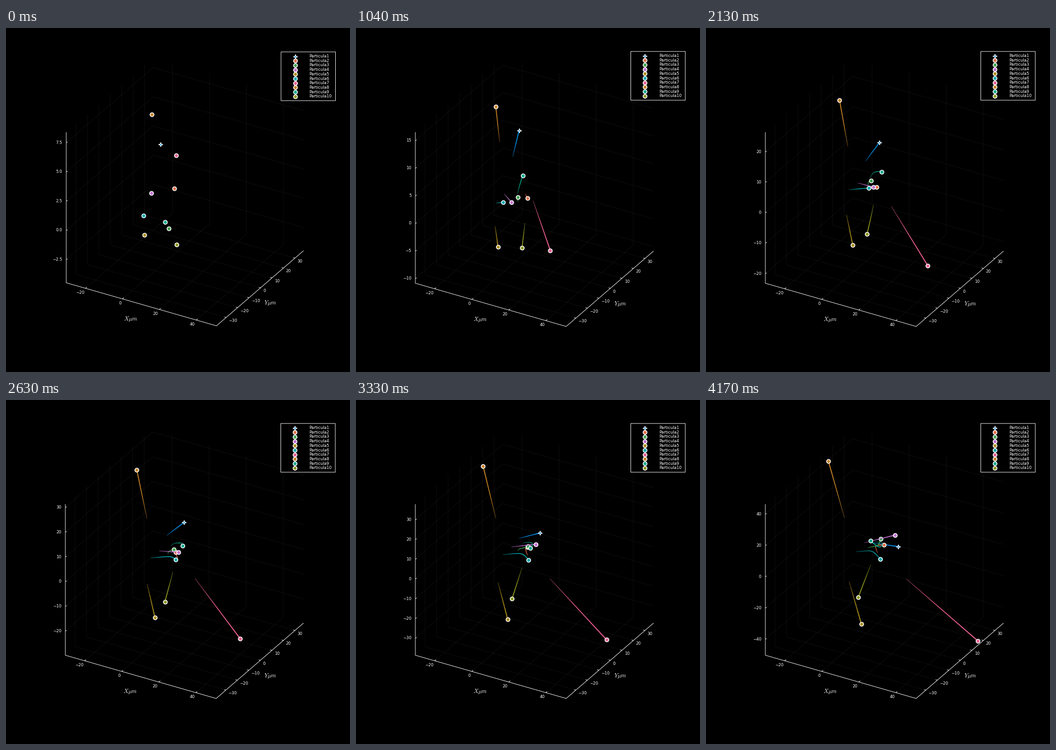
These frames come from a looping animation (748x748 px, 4210 ms). A matplotlib script:

```python
import math
import numpy as np
import matplotlib.pyplot as plt
from matplotlib.animation import FuncAnimation
from matplotlib.collections import LineCollection
from matplotlib.colors import to_rgb
from matplotlib.path import Path

FRAMES, LOOP_MS = 101, 4210
SIZE, DPI = 748, 68
PT = 72 / DPI                      # points per pixel
plt.rcParams["font.family"] = "DejaVu Sans"
plt.rcParams["mathtext.fontset"] = "cm"

# Axis vectors of the box in pixels, and the data ranges they span
EX, EY = np.array([328, 94]), np.array([190, -164])
HEIGHT = 328.5
X_LIM, Y_LIM = (-30.45, 50.95), (-38.4, 37.5)

# Left corner, scale and legend shift; depends on the z label width
WIDE = ((131, 554), 0.996, (0.5, 1))
MEDIUM = ((129, 555), 1.0, (0, 0))
NARROW = ((124, 556), 1.0077, (-0.5, -3))


class Particle:
    """Straight flight whose velocity changes softly at each hit.

    Components are screen x, floor y (pixels from the left corner) and height z.
    A hit is (time, change of velocity).
    """
    SOFT = 3

    def __init__(self, color, start, speed, *hits):
        self.color, self.start, self.speed, self.hits = color, start, speed, hits

    def at(self, t):
        pos = np.add.outer(self.start, 0 * t) + np.multiply.outer(self.speed, t)
        for when, dv in self.hits:
            since = self.SOFT * np.logaddexp(0, (t - when) / self.SOFT)
            pos = pos + np.multiply.outer(dv, since)
        return pos


PARTICLES = [
    Particle("#009afa", (205.8, -58.8, 5.05), (0.828, 1.418, 0.41),
             (20, (0, 0, -0.03))),
    Particle("#e36f47", (235.9, -49, 1.64), (0.35, -0.05, -0.052),
             (28, (-0.51, -0.27, 0)), (45, (0, 0, 0.112)),
             (72, (0.84, 0.2, -0.075))),
    Particle("#3ea44e", (223.4, -80.6, -3), (0, 0.9, 0.104),
             (20, (0, -0.75, 0)), (40, (0.56, -0.1, -0.06)),
             (80, (-0.28, -0.65, 0))),
    Particle("#c371d2", (186, -64.3, 0.65), (0.96, -0.761, -0.153)),
    Particle("#ac8e18", (170.7, -35.3, -1.78), (0.382, 0.768, -0.1627)),
    Particle("#00aaae", (168.7, -53.8, -0.85), (0.9, -0.12, -0.002),
             (26, (0.43, 0, 0)), (58, (0, 1.9, 0)), (65, (-1.15, -1.6, 0))),
    Particle("#ed5e93", (240, -36, 5), (2.225, 0.145, -0.5247)),
    Particle("#c68225", (187, -48.4, 8.02), (-0.5, -0.665, 0.322)),
    Particle("#00a98d", (216.3, -66.5, -1.91), (0.74, 0.14, 0.24),
             (24, (0, 0, -0.21)), (52, (-0.74, 0, -0.11)),
             (70, (-0.5, 0, 0)), (84, (-0.7, -1.41, 0))),
    Particle("#8e971e", (241.3, -74.3, -4.12), (-0.393, 0.29, -0.25),
             (25, (0, 0, 0.035))),
]

ANGLES = np.arange(9) * math.pi / 4
RADII = np.where(np.arange(9) % 2, 0.38, 1)
STAR = Path(np.column_stack([RADII * np.sin(ANGLES), RADII * np.cos(ANGLES)]),
            closed=True)

fig = plt.figure(figsize=(SIZE / DPI, SIZE / DPI), dpi=DPI, facecolor="black")
ax = fig.add_axes([0, 0, 1, 1])


def z_range(k):
    z = [p.at(float(k))[2] for p in PARTICLES]
    lo, hi = min(z), max(z)
    pad = 0.03 * (hi - lo)
    return lo - pad, hi + pad


def pick_ticks(lo, hi):
    """Tick step with the best mix of count, coverage and roundness."""
    best = (-1, None, None)
    for power in (0.1, 1, 10, 100):
        for q, nice in ((1, 1), (5, 0.9), (2, 0.7), (2.5, 0.6), (3, 0.2)):
            step = q * power
            ticks = step * np.arange(math.ceil(lo / step),
                                     math.floor(hi / step) + 1)
            n = len(ticks)
            if n < 2:
                continue
            score = (max(0, 1 - abs(n - 5) / 5) / 4
                     + step * (n - 1) / (hi - lo) / 3 + nice / 4)
            if score > best[0]:
                best = (score, step, ticks)
    return best[1:]


def text(x, y, s, ha="center", size=8.7):
    ax.text(x, y, s, color="white", size=size * PT, ha=ha,
            va="center_baseline" if "$" in s else "center", zorder=4)


def number(v, decimals=0):
    return f"{v:.{decimals}f}".replace("-", "\u2212")


def lines(segments, width, alpha, z):
    ax.add_collection(LineCollection(segments, colors=[(1, 1, 1, alpha)],
                                     linewidths=width * PT, zorder=z))


def marker(i, x, y, z):
    style = (dict(marker=STAR, ms=9.2 * PT, mew=1.3 * PT) if i == 0 else
             dict(marker="o", ms=8.4 * PT, mew=1.7 * PT))
    ax.plot([x], [y], color=PARTICLES[i].color, mec="white", zorder=z, **style)


def trail(color, x, y, part, z):
    pts = np.column_stack([x, y])
    alpha = np.minimum(1, 0.5 + 1.5 * (part[1:] - part[0]))
    ax.add_collection(LineCollection(
        list(zip(pts[:-1], pts[1:])), colors=[(*to_rgb(color), a) for a in alpha],
        linewidths=(0.5 + 1.9 * part[1:]) * PT, zorder=z))


def draw_box(corner, scale, lo, hi, step, ticks):
    ex, ey = EX * scale, EY * scale
    up = np.array([0, -HEIGHT * scale])
    grid, frame = [], [[corner + up, corner, corner + ex, corner + ex + ey]]

    for v in range(-20, 41, 20):
        p = corner + ex * (v - X_LIM[0]) / (X_LIM[1] - X_LIM[0])
        grid.append([p, p + ey, p + ey + up])
        frame.append([p, p + (3, -2.6)])
        text(p[0] - 2.5, p[1] + 9, number(v), "right")
    for v in range(-30, 31, 10):
        p = corner + ey * (v - Y_LIM[0]) / (Y_LIM[1] - Y_LIM[0])
        grid.append([p + ex, p, p + up])
        p = p + ex
        frame.append([p, p + (-3.8, -1.1)])
        text(p[0] + 5.5, p[1] + 7, number(v), "left")
    for v in ticks:
        p = corner + up * (v - lo) / (hi - lo)
        grid.append([p, p + ey, p + ey + ex])
        frame.append([p, p + (3, -1.5)])
        text(p[0] - 8.5, p[1], number(v, 1 if step % 1 else 0), "right")

    lines(grid, 0.9, 0.065, 1)
    lines(frame, 1, 1, 2)
    mx, my = corner + ex / 2, corner + ex + ey / 2
    text(mx[0] - 23, mx[1] + 30, r"$X\mu m$", size=12.4)
    text(my[0] + 22.5, my[1] + 30, r"$Y\mu m$", size=12.4)


def draw_legend(dx, dy):
    x, y = 597.5 + dx, 51 + dy
    ax.add_patch(plt.Rectangle((x, y), 118.5, 106, fc="black", ec="white",
                               lw=PT, zorder=3, snap=False))
    for i in range(len(PARTICLES)):
        row = y + 9.5 + 9.7 * i
        marker(i, x + 31, row, 5 + i)
        text(x + 61.5, row, f"Particula{i + 1}", "left")


def draw(k):
    ax.clear()
    ax.set_xlim(0, SIZE)
    ax.set_ylim(SIZE, 0)
    ax.axis("off")

    lo, hi = z_range(k)
    step, ticks = pick_ticks(lo, hi)
    if step % 1:
        layout = WIDE
    else:
        layout = NARROW if ticks[0] > -10 else MEDIUM
    corner, scale, shift = np.array(layout[0], float), layout[1], layout[2]
    draw_box(corner, scale, lo, hi, step, ticks)

    # A trail covers the last 70 % of the elapsed time
    part = np.linspace(0.3, 1, 45)
    for i, p in enumerate(PARTICLES):
        u, w, z = p.at(part * k)
        x = corner[0] + scale * u
        y = corner[1] + scale * (w - HEIGHT * (z - lo) / (hi - lo))
        if k:
            trail(p.color, x, y, part, 20 + 2 * i)
        marker(i, x[-1], y[-1], 21 + 2 * i)

    draw_legend(*shift)
    return []


anim = FuncAnimation(fig, draw, frames=FRAMES, interval=LOOP_MS / FRAMES,
                     init_func=lambda: [], repeat=True, repeat_delay=0,
                     cache_frame_data=False)
plt.show()
```
